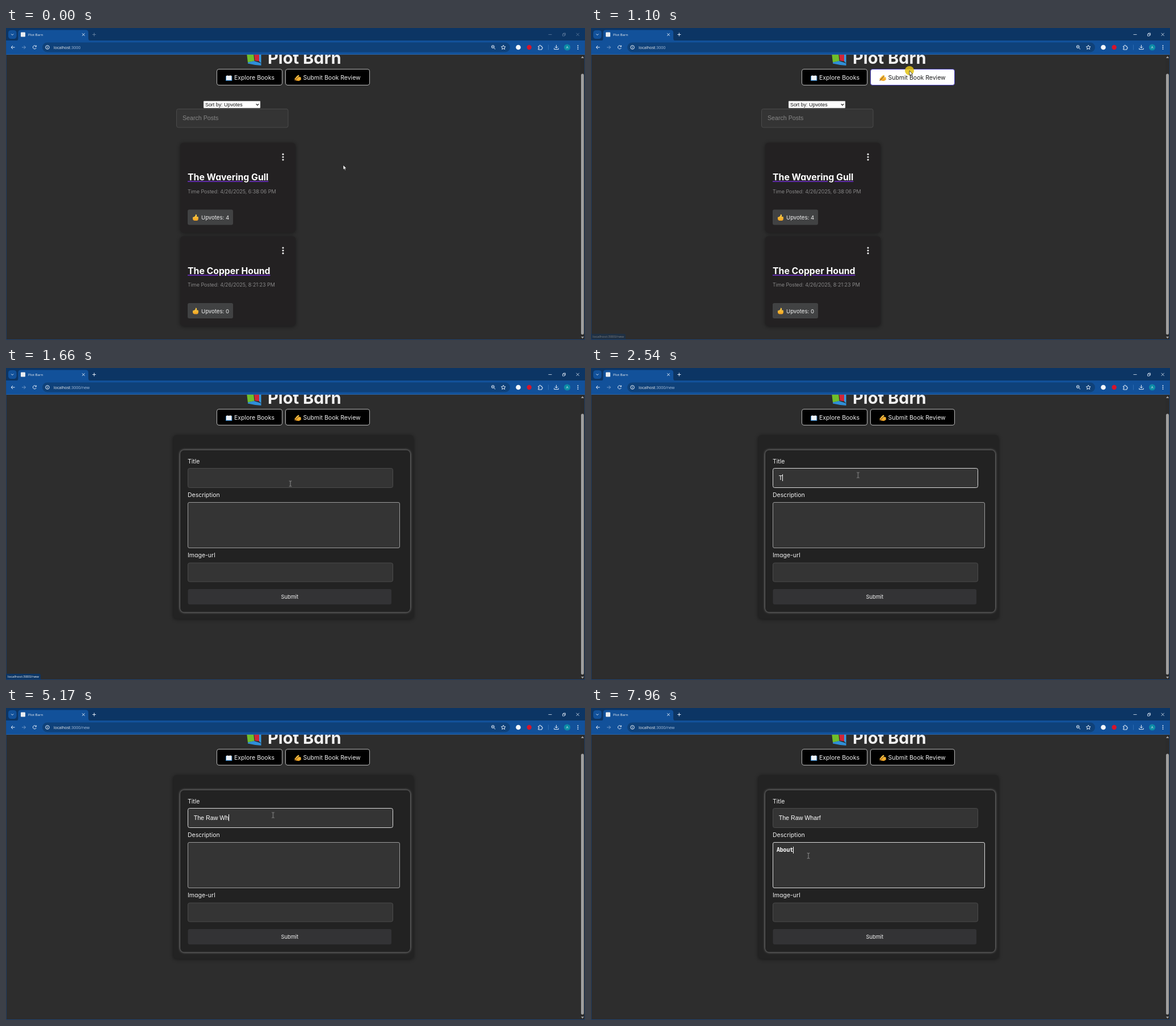
These frames come from a looping animation (1020x549 px, 8000 ms). An HTML page:

```html
<!DOCTYPE html>
<html lang="en">
<head>
<meta charset="utf-8">
<title>Plot Barn</title>
<style>
  html, body { margin: 0; width: 100%; height: 100%; overflow: hidden; background: #2d2d2d; }
  #stage { position: relative; width: 1020px; height: 549px; overflow: hidden; }
  #stage > div, svg { position: absolute; left: 0; top: 0; width: 1020px; height: 549px; display: block; }
  text, .link { font-family: Inter, "Open Sans", sans-serif; font-feature-settings: "cv11"; fill: #f2f2f2; }
  .ui { font-family: "Open Sans", "Noto Sans", sans-serif; }
  .arial { font-family: "Liberation Sans", Arial, sans-serif; }
  .nav { font-size: 10.5px; }
  .label { font-size: 10.5px; }
  .time { font-size: 9px; font-weight: 300; fill: #a3a3a3; }
  .votes { font-size: 9.6px; }
  .line { fill: none; stroke: #e4edf8; stroke-width: 1; }
  .field { fill: #343434; stroke: #4b4b4b; }
  .card { fill: #232122; filter: drop-shadow(0 1px 3px rgba(0, 0, 0, .45)); }
  .link { position: absolute; left: 320px; font-size: 15.8px; font-weight: 700; line-height: 20px;
    white-space: nowrap; color: #fff; text-decoration: underline #5f2ba6 1.5px; text-underline-offset: 1.2px; }
  .typed { position: absolute; height: 12px; line-height: 12px; white-space: pre; color: #fff;
    border-right: 1px solid transparent; }
  #title { left: 330.7px; top: 187px; font-size: 10.67px; }
  #about { left: 327px; top: 243.5px; font: 600 9.7px/12px "Noto Sans Mono", "DejaVu Sans Mono", monospace; }

  /* one loop is 8000 ms, so 1% is 80 ms */
  .anim { animation: 8s step-end infinite; }
  #list { animation-name: list; }
  #form { animation-name: form; }
  #pathname { animation-name: form; }
  #active { animation-name: active; }
  #navBox { animation-name: navBox; }
  #navText { animation-name: navText; }
  #status { animation-name: status; }
  #titleBox { animation-name: titleBox; }
  #aboutBox { animation-name: aboutBox; }
  #arrow { animation-name: arrow; }
  #beam { animation-name: beam; }
  #click { animation-name: click; }
  #pointer { animation: pointer 8s linear infinite; }

  @keyframes list { 0% { visibility: visible } 15.5%, 100% { visibility: hidden } }
  @keyframes form { 0% { visibility: hidden } 15.5%, 100% { visibility: visible } }
  @keyframes active { 0% { opacity: .4 } .875%, 100% { opacity: 1 } }
  @keyframes navBox {
    0%, 17.25%, 100% { fill: #000; stroke: #b8b8b8 }
    11.375% { fill: #fff; stroke: #4c43c4 }
  }
  @keyframes navText { 0%, 17.25%, 100% { fill: #f2f2f2 } 11.375% { fill: #1c1c1c } }
  @keyframes status { 0%, 23.375%, 100% { opacity: 0 } 13.75% { opacity: .4 } 14.625% { opacity: 1 } }
  @keyframes titleBox { 0%, 82.375%, 100% { stroke: #4b4b4b } 24.25% { stroke: #dcdcdc } }
  @keyframes aboutBox { 0% { stroke: #9c9c9c } 82.375%, 100% { stroke: #dcdcdc } }
  @keyframes arrow { 0% { visibility: visible } 19.875%, 100% { visibility: hidden } }
  @keyframes beam { 0% { visibility: hidden } 19.875%, 100% { visibility: visible } }
  @keyframes click {
    0%, 4.125%, 15.5%, 27.625%, 84.5%, 100% { opacity: 0; transform: translate(0, 0) }
    .875%, 13.75% { opacity: .85; transform: translate(0, 0) }
    24.25%, 82.375% { opacity: .5; transform: translate(8.5px, 3.5px) }
    25.125% { opacity: .12; transform: translate(5px, 2px) }
  }
  @keyframes pointer {
    0% { transform: translate(594px, 241px) }
    3.25% { transform: translate(594px, 241px); animation-timing-function: steps(6) }
    8.5% { transform: translate(574px, 150px); animation-timing-function: steps(6) }
    13.75% { transform: translate(561px, 75px); animation-timing-function: steps(3) }
    16.375% { transform: translate(558px, 90px); animation-timing-function: steps(5) }
    20.75% { transform: translate(501px, 203.5px); animation-timing-function: steps(4) }
    24.25% { transform: translate(470.5px, 188.5px) }
    75.125% { transform: translate(470.5px, 188.5px); animation-timing-function: steps(4) }
    79.25% { transform: translate(322px, 174px); animation-timing-function: steps(4) }
    83.4% { transform: translate(383px, 260px) }
    100% { transform: translate(383px, 260px) }
  }
</style>
</head>
<body>
<div id="stage">
  <svg viewBox="0 0 1020 549">
    <defs>
      <linearGradient id="skin" x2="0" y2="1">
        <stop stop-color="#ffd24a"/><stop offset="1" stop-color="#f0a020"/>
      </linearGradient>
      <g id="thumb">
        <path d="M329 333 L332 332 Q334.5 330.5 334 328 Q336 327.6 336.2 330 L335.8 332 H338 Q339.4 332.4 338.9 334 Q339.2 338.6 336.5 339 H332.5 Q329.3 338.5 329 336 Z" fill="url(#skin)"/>
      </g>
      <g id="dots" fill="#e6e6e6">
        <circle cx="488" cy="222.2" r="1.6"/><circle cx="488" cy="227" r="1.6"/><circle cx="488" cy="231.8" r="1.6"/>
      </g>
    </defs>
    <rect width="1020" height="549" fill="#2d2d2d"/>

    <!-- page header -->
    <path d="M424 44 H436 L437.5 58 L426 60.5 Z" fill="#6fbf2a"/>
    <path d="M426 60.5 L437 58 L449.5 62 V66 L439 65 L426 62.5 Z" fill="#2f8fd8"/>
    <path d="M437 44 H446 V58.5 L438.5 57.5 Z" fill="#cf2637"/>
    <path d="M446 44 L449.5 46 V62 L446 58.5 Z" fill="#3a9be2"/>
    <text x="461" y="62.7" font-size="29" font-weight="700">Plot Barn</text>

    <rect x="371.5" y="72.5" width="115" height="28" rx="3.5" stroke="#b8b8b8"/>
    <path d="M387 84.5 H398.3 V93 H387 Z" fill="#2f7fc4"/>
    <path d="M388 84 Q391 83 392.6 84.2 Q394.5 83 397.4 84 V91.8 H388 Z" fill="#eef1f4"/>
    <text class="nav" x="402" y="91">Explore Books</text>

    <rect id="navBox" class="anim" x="492.5" y="72.5" width="148" height="28" rx="3.5" stroke="#b8b8b8"/>
    <path d="M508 90 L512.5 84.5 L515.5 82.5 L516.5 84 L514.5 86 L519.5 86.5 L519.8 91 L516 93.2 L511 92.5 Z" fill="url(#skin)"/>
    <path d="M508.5 92.8 L516.8 84.2" stroke="#8a5a2b" stroke-width="1.1"/>
    <text id="navText" class="nav anim" x="523.5" y="91">Submit Book Review</text>

    <!-- browser bars -->
    <rect width="1020" height="23" fill="#0c3564"/>
    <rect y="22" width="1020" height="24" fill="#12519a"/>
    <rect y="46" width="1020" height="1" fill="#2a63a6"/>
    <path d="M18 22.5 Q21.5 22 21.5 18 V8 Q21.5 3.5 26 3.5 H140.5 Q145 3.5 145 8 V18 Q145 22 148.5 22.5 Z" fill="#12519a"/>
    <rect x="4" y="4" width="14.5" height="15" rx="4.5" fill="#12519a"/>
    <path class="line" d="M9.2 10.5 L11.2 12.5 L13.2 10.5"/>
    <rect x="26" y="7.5" width="8" height="8" rx="1" fill="#e9edf2"/>
    <text class="ui" x="39" y="13.8" font-size="6.1">Plot Barn</text>
    <path class="line" d="M134.2 9.4 L138.6 13.8 M138.6 9.4 L134.2 13.8"/>
    <g id="active" class="line anim">
      <path d="M152.3 11.5 H158.3 M155.3 8.5 V14.5"/>
      <path d="M955.5 11.5 H961.5" stroke-width=".8"/>
      <path d="M980.5 10.5 H984 V14 H980.5 Z M982 10.3 V9 H985.5 V12.6 H984.2" stroke-width=".8"/>
      <path d="M1004.6 8.8 L1009.8 14 M1009.8 8.8 L1004.6 14" stroke-width=".8"/>
    </g>

    <rect x="64" y="25.5" width="824" height="17" rx="8.5" fill="#0f4179"/>
    <path class="line" d="M15.5 34 H9.2 M12 31 L9 34 L12 37"/>
    <path class="line" d="M28 34 H34.3 M31.5 31 L34.5 34 L31.5 37" opacity=".45"/>
    <path class="line" d="M53 32.3 A3 3 0 1 0 53.2 35 M53.4 30.6 V32.8 H51.2"/>
    <circle class="line" cx="73" cy="34" r="3.3" stroke-width=".8"/>
    <path class="line" d="M73 33.4 V35.8 M73 31.9 V32.6" stroke-width=".8"/>
    <text class="ui" x="84" y="36.5" font-size="7">localhost<tspan fill="#a9c0dd">:3000<tspan id="pathname" class="anim">/new</tspan></tspan></text>
    <circle class="line" cx="857.8" cy="33" r="2.4"/>
    <path class="line" d="M859.6 35 L862 37.4 M856.6 33 H859" stroke-width=".9"/>
    <path class="line" d="M876.2 30.2 L877.3 32.7 L880 33 L878 34.8 L878.6 37.5 L876.2 36.1 L873.8 37.5 L874.4 34.8 L872.4 33 L875.1 32.7 Z" stroke-width=".8"/>
    <circle cx="902.5" cy="34" r="4.3" fill="#f3f6fa"/>
    <circle cx="921.7" cy="34" r="4.2" fill="#d5152c"/>
    <path class="line" d="M937.8 32 H939.6 Q939.6 30 940.8 30 Q942 30 942 32 H944 V34 Q945.6 34 945.6 35 Q945.6 36 944 36 V38 H937.8 V36 Q939.4 36 939.4 35 Q939.4 34 937.8 34 Z"/>
    <path d="M955.5 29.5 V38.5" stroke="#2f6cb2"/>
    <path class="line" d="M969.5 29.8 V35 M967 32.8 L969.5 35.3 L972 32.8 M965.8 35.3 V37.6 H973.2 V35.3"/>
    <circle cx="988.6" cy="34" r="5.6" fill="#0c8ca6"/>
    <text class="ui" x="988.6" y="36.2" font-size="6" text-anchor="middle">A</text>
    <g fill="#e4edf8"><circle cx="1007.5" cy="31" r=".9"/><circle cx="1007.5" cy="34" r=".9"/><circle cx="1007.5" cy="37" r=".9"/></g>

    <!-- scrollbar and window edge -->
    <rect x="1012" y="47" width="7" height="501" fill="#2b2b2b"/>
    <path d="M1013 53 L1015.6 49.5 L1018.2 53 Z M1013 543 L1015.6 546.5 L1018.2 543 Z" fill="#a0a0a0"/>
    <rect x="1013" y="80.5" width="5" height="459" rx="2.5" fill="#9f9f9f"/>
    <path d="M.3 23 V548.5 H1019.7 V23" fill="none" stroke="#1b4a85" stroke-width=".8"/>
  </svg>

  <div id="list" class="anim">
    <svg viewBox="0 0 1020 549">
      <rect x="348" y="128.5" width="100" height="12.5" rx="1" fill="#fff" stroke="#777" stroke-width=".5"/>
      <text class="arial" x="351" y="137.7" font-size="8.89" style="fill:#111">Sort by: Upvotes</text>
      <path d="M440.6 133.6 L443 136 L445.4 133.6" fill="none" stroke="#111" stroke-width="1.2"/>
      <rect class="field" x="300.5" y="142.5" width="196.5" height="32.5" rx="3"/>
      <text class="arial" x="311" y="162" font-size="10.67" style="fill:#868686">Search Posts</text>

      <rect class="card" x="307" y="202" width="203" height="158" rx="6"/>
      <use href="#dots"/>
      <text class="time" x="320" y="290.5">Time Posted: 4/26/2025, 6:38:06 PM</text>
      <rect x="320" y="319.5" width="80" height="27" rx="3" fill="#414243"/>
      <use href="#thumb"/>
      <text class="votes" x="344" y="337.3">Upvotes: 4</text>

      <g transform="translate(0 164.6)">
        <rect class="card" x="307" y="202" width="203" height="158" rx="6"/>
        <use href="#dots"/>
        <text class="time" x="320" y="290.5">Time Posted: 4/26/2025, 8:21:23 PM</text>
        <rect x="320" y="319.5" width="80" height="27" rx="3" fill="#414243"/>
        <use href="#thumb"/>
        <text class="votes" x="344" y="337.3">Upvotes: 0</text>
      </g>
    </svg>
    <span class="link" style="top:253px">The Wavering Gull</span>
    <span class="link" style="top:417.5px">The Copper Hound</span>
  </div>

  <div id="form" class="anim">
    <svg viewBox="0 0 1020 549">
      <rect class="card" x="294.5" y="118" width="423.5" height="323.5" rx="6" style="fill:#232323"/>
      <rect x="307" y="144.5" width="405" height="285" rx="7" fill="#222" style="filter:drop-shadow(0 0 2.2px #a6a6a6)"/>
      <text class="label" x="320" y="167.5">Title</text>
      <rect id="titleBox" class="field anim" x="320.5" y="176.5" width="361" height="34" rx="3"/>
      <text class="label" x="320" y="226.7">Description</text>
      <rect id="aboutBox" class="field anim" x="320.5" y="236.5" width="373" height="80" rx="2.5"/>
      <text class="label" x="320" y="333.3">Image-url</text>
      <rect class="field" x="320.5" y="343" width="361" height="33" rx="3"/>
      <rect x="320.5" y="389" width="358.5" height="27" rx="3" fill="#333335"/>
      <text x="499.8" y="405.5" font-size="9.3" text-anchor="middle">Submit</text>
    </svg>
    <span id="title" class="typed arial"></span>
    <span id="about" class="typed"></span>
  </div>

  <svg viewBox="0 0 1020 549">
    <g id="status" class="anim">
      <path d="M0 538 H58 Q61 538 61 541 V548 H0 Z" fill="#0c3564"/>
      <text class="ui" x="3" y="545" font-size="6.1">localhost:3000/new</text>
    </g>
    <g id="pointer">
      <circle id="click" class="anim" r="8" fill="#e3c414"/>
      <path id="arrow" class="anim" d="M0 0 V8.4 L1.9 6.7 L3.2 9.6 L4.6 9 L3.3 6.2 H5.9 Z" fill="#fff" stroke="#111" stroke-width=".7"/>
      <path id="beam" class="anim" d="M-2.3 -4.8 Q0 -4.8 0 -3.8 Q0 -4.8 2.3 -4.8 M0 -4 V4 M-2.3 4.8 Q0 4.8 0 3.8 Q0 4.8 2.3 4.8" fill="none" stroke="#a6a6a6" stroke-width=".8"/>
    </g>
  </svg>
</div>
<script>
  const LOOP = 8000, BLINK = 530;
  const fields = [
    { id: "title", text: "The Raw Wharf", focus: 1940, blur: 6590,
      keys: [2540, 3000, 3130, 3260, 3590, 4050, 4250, 4510, 4770, 5170, 5300, 5500, 5630] },
    { id: "about", text: "About", focus: 6590, blur: LOOP,
      keys: [6840, 7570, 7700, 7830, 7960] }
  ];
  for (const f of fields) f.el = document.getElementById(f.id);

  function type(f, t) {
    const count = f.keys.filter(k => k <= t).length;
    const since = t - (count ? f.keys[count - 1] : f.focus);
    const caret = t >= f.focus && t < f.blur && since % (2 * BLINK) < BLINK;
    f.el.textContent = f.text.slice(0, count);
    f.el.style.borderRightColor = caret ? "#fff" : "transparent";
  }

  let start;
  function frame(now) {
    start ??= now;
    const t = (now - start) % LOOP;
    for (const f of fields) type(f, t);
    requestAnimationFrame(frame);
  }
  requestAnimationFrame(frame);
</script>
</body>
</html>
```
